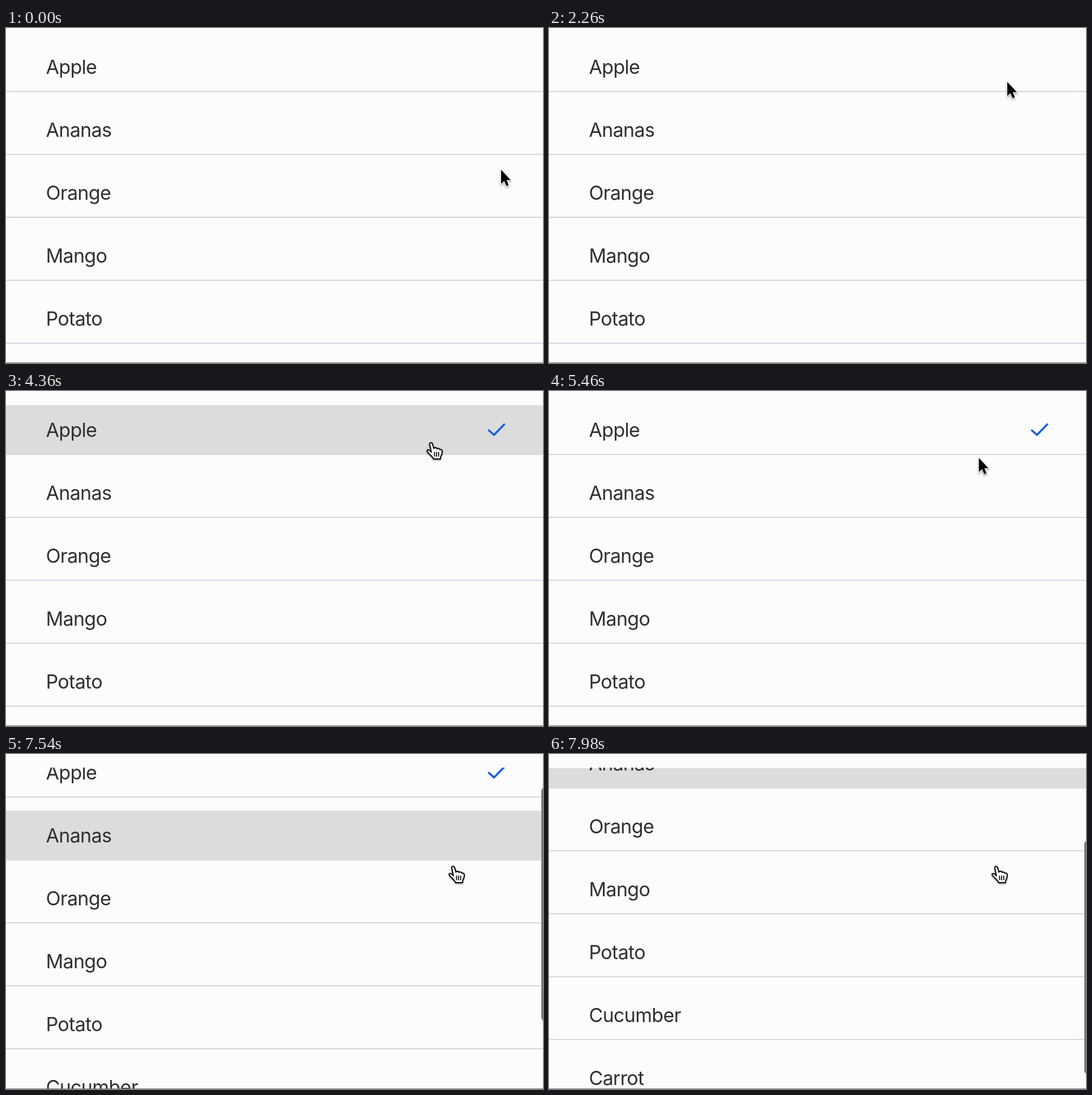
An HTML page for the animation above (8000 ms loop, 948x591 px).

```html
<!DOCTYPE html>
<html lang="en">
<head>
<meta charset="utf-8">
<title>Selectable list</title>
<style>
  html, body { margin: 0; width: 100%; height: 100%; overflow: hidden; background: #fcfcfd; }
  svg { display: block; width: 948px; height: 591px; }
  text { font: 400 34px Inter, "Open Sans", sans-serif; letter-spacing: -.02em; fill: #303033; }
  .line { fill: #d5d5de; }
  .hover { fill: #dcdcdc; }
  .pointer { filter: drop-shadow(0 2px 1.5px rgba(0, 0, 0, .35)); }
</style>
</head>
<body>
<svg viewBox="0 0 948 591">
  <clipPath id="view"><rect y="24" width="948" height="567"/></clipPath>
  <g clip-path="url(#view)">
    <g id="list">
      <path id="check" d="M852.5 69.5L861.5 77.5L879.5 59" fill="none" stroke="#1b5fe0"
        stroke-width="3.6" stroke-linecap="round" stroke-linejoin="round"/>
    </g>
  </g>
  <rect id="thumb" x="945" width="14" height="413" rx="7" fill="#77777b"/>
  <rect y="590" width="948" height="1" fill="#77756a"/>
  <g id="arrow" class="pointer">
    <path d="M0 0V25L5.5 20L9.5 29L13.5 27.2L9.8 18.3H17Z" fill="#000" stroke="#fff"
      stroke-width="2.4" paint-order="stroke"/>
  </g>
  <g id="hand" class="pointer">
    <g transform="translate(-7 -1)" stroke="#000" stroke-linejoin="round" stroke-linecap="round">
      <path d="M6 4.5C5 .5 10 0 11 3.5L13.3 11.5C14 9 18 9 18.8 12C20 10.5 23 11 23.8 13.5
        C25.5 12.3 27.7 13.3 28 16C28.4 20 27.5 22 25.5 25.5L25 30H12.8C11.5 26 7 23.5 4.5 20
        L1.6 16.8C.5 14 3 12.8 5.2 14.6L8.8 17.8Z" fill="#fff" stroke-width="2"/>
      <path d="M14.3 18L14.7 25M18 18L18.2 25M21.7 18V25" fill="none" stroke-width="1.7"/>
    </g>
  </g>
</svg>
<script>
const LOOP = 8000, PITCH = 111;
const names = ["Apple", "Ananas", "Orange", "Mango", "Potato", "Cucumber", "Carrot"];
const $ = id => document.getElementById(id);

function add(tag, attrs, label = "") {
  const node = document.createElementNS("http://www.w3.org/2000/svg", tag);
  for (const key in attrs) node.setAttribute(key, attrs[key]);
  node.textContent = label;
  $("list").insertBefore(node, $("check"));
  return node;
}

const hovers = names.map((name, i) => {
  const y = i * PITCH;
  add("rect", { class: "line", y: y + 111, width: 948, height: 2 });
  const hover = add("rect", { class: "hover", y: y + 25, width: 948, height: 88 });
  add("text", { x: 70.5, y: y + 81 }, name);
  return hover;
});

// Pointer keys: time, x, y
const path = [
  [0, 874, 250], [820, 814, 107], [920, 806, 98], [1000, 809, 95],
  [2260, 809, 95], [2600, 750, 92], [3060, 750, 92], [3200, 749, 91],
  [5100, 749, 91], [6200, 788, 198], [LOOP, 788, 198]
];

function pointerAt(t) {
  const i = path.findIndex(key => key[0] > t);
  const [t0, x0, y0] = path[i - 1], [t1, x1, y1] = path[i];
  const u = (t - t0) / (t1 - t0), e = u * u * (3 - 2 * u);
  return [x0 + (x1 - x0) * e, y0 + (y1 - y0) * e];
}

const show = (node, on) => node.setAttribute("visibility", on ? "visible" : "hidden");
const move = (node, x, y) => node.setAttribute("transform", `translate(${x} ${y})`);

function draw(t) {
  const [x, y] = pointerAt(t);
  const scroll = 81.5 * (Math.max(0, t - 7314) / 406) ** 1.4;
  const active = t < 2400 ? -1 : y < 113 ? 0 : y < 136 ? -1 : 1;

  hovers.forEach((node, i) => {
    show(node, i === active);
    // Rows stay below the top edge of the list
    const top = Math.max(i * PITCH + 25, scroll + 25);
    node.setAttribute("y", top);
    node.setAttribute("height", Math.max(0, i * PITCH + 113 - top));
  });
  show($("check"), t >= 3100);
  move($("list"), 0, -scroll);

  show($("thumb"), scroll > 0);
  $("thumb").setAttribute("y", 32 + scroll * .736);

  for (const id of ["arrow", "hand"]) {
    show($(id), (id === "hand") === (active >= 0));
    move($(id), x, y);
  }
}

const start = performance.now();
function tick() {
  draw((performance.now() - start) % LOOP);
  requestAnimationFrame(tick);
}
tick();
</script>
</body>
</html>
```
